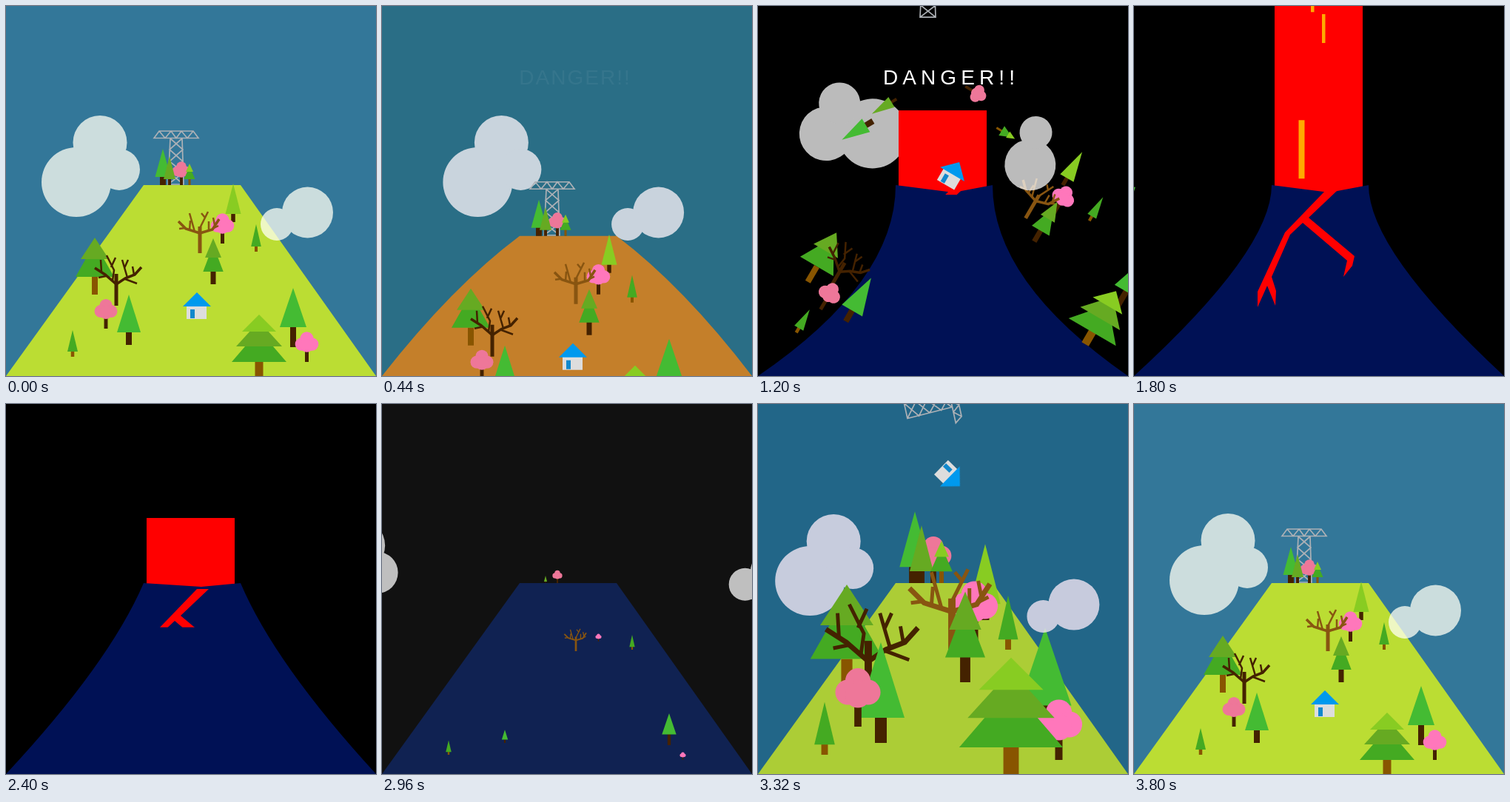
These frames come from a looping animation (500x500 px, 3840 ms). An HTML page:

```html
<!DOCTYPE html>
<html lang="en">
<head>
<meta charset="utf-8">
<title>Volcano</title>
<style>
html, body { margin: 0; width: 100%; height: 100%; overflow: hidden; background: #000; }
svg { display: block; width: 100vw; height: 100vh; }
.sky, .hill, .dip, .fly, .grow, .toss, .cloud, .lava, .bars, .crack, text {
  animation: 3840ms linear infinite;
}
.sky { animation-name: sky; }
.hill { animation-name: paint, bend; }
.dip { animation-name: dip; }
.fly { animation-name: fly; }
.grow { animation-name: grow; }
.toss { animation-name: toss; }
.cloud { animation-name: cloud, tint; opacity: .75; }
.lava { animation-name: lava; fill: #f00; }
.bars { animation-name: bars; fill: #fa0; }
.bars rect { animation: rise 480ms linear infinite; }
.crack { animation-name: crack; fill: #f00; }
text {
  font: 28px "Liberation Sans", Arial, sans-serif;
  fill: #fff; text-anchor: middle; animation-name: warn;
}

@keyframes sky {
  0% { fill: #379; } 20.83% { fill: #267; } 26.04% { fill: #156; }
  30.21%, 75.5% { fill: #000; } 77.08% { fill: #111; }
  86.46% { fill: #268; } 88.5%, to { fill: #379; }
}
@keyframes tint {
  0% { fill: #fffff4; } 20.83% { fill: #ffeefe; }
  30.21%, 77.08% { fill: #fafafa; }
  86.46% { fill: #ffeefa; } 88.5%, to { fill: #fffff4; }
}
@keyframes paint {
  0% { fill: #bd3; } 20.83% { fill: #c32; } 26.04% { fill: #d01020; }
  30.21%, 76.17% { fill: #015; } 87.37%, to { fill: #bd3; }
}
@keyframes bend {
  0% {
    d: path("M0 500Q93 371 186 242L264 242L317 242Q408.5 371 500 500Z");
    animation-timing-function: cubic-bezier(.37, 0, .63, 1);
  }
  23.44%, 26.04% { d: path("M0 500Q96 388 186 384L264 384L317 384Q407 388 500 500Z"); }
  29.17%, 31.25% { d: path("M0 500Q186 373 186 242L264 252L317 242Q317 373 500 500Z"); }
  40%, 57.3% { d: path("M0 500Q186 330 186 242L264 252L317 242Q317 330 500 500Z"); }
  67.7%, to { d: path("M0 500Q93 371 186 242L264 242L317 242Q408.5 371 500 500Z"); }
}
@keyframes dip {
  0% { translate: 0 0; animation-timing-function: cubic-bezier(.37, 0, .63, 1); }
  23.44%, 26.04% { translate: 0 142px; }
  29.17%, to { translate: 0 0; }
}
@keyframes fly {
  0%, 28.125% { translate: 0 0; rotate: 0deg; }
  51.56% { translate: var(--x) var(--y); rotate: var(--r); }
  51.57%, to { translate: 0 0; rotate: 0deg; }
}
@keyframes toss {
  0%, 28.125% { translate: 0 0; rotate: 0deg; }
  51.56% { translate: var(--x) var(--y); rotate: var(--r); }
  75.52% {
    translate: var(--fx) var(--fy); rotate: var(--fr);
    animation-timing-function: cubic-bezier(.333, .667, .667, 1);
  }
  97.4%, to { translate: 0 0; rotate: 0deg; }
}
@keyframes cloud {
  0% { translate: 0 0; rotate: 0deg; animation-timing-function: cubic-bezier(.37, 0, .63, 1); }
  23.44%, 28.125% { translate: var(--in) 0; rotate: 0deg; }
  46.87% { translate: var(--x) var(--y); rotate: var(--r); }
  46.88%, 72.92% {
    translate: var(--fx) var(--fy); rotate: 0deg;
    animation-timing-function: cubic-bezier(.333, 1, .667, 1);
  }
  97.4%, to { translate: 0 0; rotate: 0deg; }
}
@keyframes grow {
  0%, 47.91% { scale: 1; }
  47.92%, 75% { scale: 0; animation-timing-function: cubic-bezier(.3, .35, .6, 1); }
  85.42% { scale: 2; animation-timing-function: cubic-bezier(.45, 0, .55, 1); }
  94.8%, to { scale: 1; }
}
@keyframes lava {
  0%, 29.16% { translate: 0 500px; }
  29.17% { translate: 0 242px; }
  34.22%, 58.6% { translate: 0 0; }
  65.1% { translate: 0 255px; }
  65.11%, to { translate: 0 500px; }
}
@keyframes bars {
  0%, 34.3% { opacity: 0; }
  34.31%, 58.6% { opacity: 1; }
  58.61%, to { opacity: 0; }
}
@keyframes rise {
  from { translate: 0 260px; }
  to { translate: 0 -100px; }
}
@keyframes crack {
  0%, 29.17% { clip-path: inset(0 0 100% 0); }
  31.25% { clip-path: inset(0 0 97% 0); }
  44.3%, 57.3% { clip-path: inset(0); }
  65.1%, to { clip-path: inset(0 0 100% 0); }
}
@keyframes warn {
  0%, 10.42% { opacity: 0; letter-spacing: 1.8px; }
  31.25% { opacity: 1; letter-spacing: 6.1px; }
  35.2% { opacity: 1; letter-spacing: 7px; }
  43%, to { opacity: 0; letter-spacing: 9px; }
}
</style>
</head>
<body>
<svg viewBox="0 0 500 500">
  <rect class="sky" width="500" height="500"/>
  <g transform="translate(115 216)">
    <g class="cloud" style="--in:71px;--x:-289px;--y:-294px;--r:-720deg;--fx:-280px;--fy:12px">
      <circle cx="-20" cy="22" r="47"/><circle cx="12" cy="-31.500" r="36.500"/><circle cx="38" cy="5" r="28"/>
    </g>
  </g>
  <text x="261" y="106">DANGER!!</text>
  <g class="lava">
    <rect x="190" width="119" height="260"/>
    <g class="bars">
      <rect x="239" width="4.500" height="40" style="animation-delay:-28ms"/>
      <rect x="254" width="4.500" height="39" style="animation-delay:-451ms"/>
      <rect x="222.500" width="8" height="79" style="animation-delay:-260ms"/>
    </g>
  </g>
  <path class="hill"/>
  <path class="crack" d="M258 250L274 250L236 286L298 338L295 351L283 366L288 344L228 293L211 309L186 366L192 385L191 405L180 378L167 407L167 386L204 306Z"/>
  <g class="dip" id="land"></g>
  <g transform="translate(393 281)">
    <g class="cloud" style="--in:-70px;--x:231px;--y:-474px;--r:720deg;--fx:219px;--fy:-90px">
      <circle cx="14.500" cy="-2" r="34.500"/><circle cx="-27" cy="14" r="22"/>
    </g>
  </g>
</svg>
<script>
const DARK = '#420', BROWN = '#850';
const GREEN = '#4b3', MOSS = '#4a2', OLIVE = '#6a2', LIME = '#8c2';
const ROSE = '#e79', PINK = '#f7b';

// Every shape stands on its own origin, growing upwards.
const trunk = (w, h, fill) => `<rect x="${-w / 2}" y="${-h}" width="${w}" height="${h}" fill="${fill}"/>`;
const tier = (w, top, bottom, fill) => `<path fill="${fill}" d="M0 ${-top}L${w} ${-bottom}H${-w}Z"/>`;
const pine = (h, foot, w, fill, tw, bark) => trunk(tw, foot + 1, bark) + tier(w, h, foot, fill);

const blossom = (s, fill) => `<g transform="scale(${s})">${trunk(5, 20, DARK)}<g fill="${fill}">` +
  [[0, -32], [-7, -24], [7, -24], [0, -22]].map(([x, y]) => `<circle cx="${x}" cy="${y}" r="8.800"/>`).join('') +
  '</g></g>';

const bare = (stroke, limbs, twigs, h) => trunk(5, h, stroke) +
  `<g fill="none" stroke="${stroke}"><path stroke-width="3.500" d="${limbs}"/><path stroke-width="2.500" d="${twigs}"/></g>`;

const bareLeft = bare(DARK,
  'M0-29L-15-42L-29-51M0-29L12-37L25-42L34-52',
  'M-14-40L-24-38M-20-45L-21-62M-5-34L-3-48L-13-68M-7-52L-1-65M15-38L8-62M11-51L16-62M12-36L28-30M24-42L22-53', 43);
const bareRight = bare('#851',
  'M0-27L-19-33L-29-43M0-27L17-32L26-46',
  'M-14-31L-13-44M-20-34L-28-33M-7-29L-14-54M0-34L11-56M7-48L2-54M12-31L12-43M17-33L25-37M20-38L18-48', 36);

const house = '<path fill="#ddd" d="M-14-18H13V0H-14Z"/><path fill="#09e" d="M-19-17L0-36L19-17Z"/><path fill="#18c" d="M-9-13H-3V-1H-9Z"/>';
const tower = '<path fill="none" stroke="#adb1b6" stroke-width="1.700" d="M-30-62.500L-23-72H23L30-62.500Z' +
  'M-23-72L-15-62.500L-7-72L0-62.500L7-72L15-62.500L23-72' +
  'M-8-62L-11 0H10L8-62M-8-62L9-47L-9-31L10-16L-11 0M8-62L-9-47L9-31L-10-16L10 0"/>';

const place = (x, y, h, cls, vars, body) =>
  `<g transform="translate(${x} ${y})"><g class="${cls}" style="transform-origin:0 ${-h / 2}px;${vars}">${body}</g></g>`;

// Drift is the offset reached 120 ms after the blast; the flight lasts 900 ms.
const drift = (x, y, r) => `--x:${x * 7.5}px;--y:${y * 7.5}px;--r:${r * 7.5}deg;`;
const plant = (x, y, h, late, dx, dy, r, body) =>
  place(x, y, h, 'fly', drift(dx, dy, r), `<g class="grow" style="animation-delay:${late * 40}ms">${body}</g>`);

document.getElementById('land').innerHTML = [
  place(230, 241, 72, 'toss', drift(0, -224, 0) + '--fx:20px;--fy:-816px;--fr:312deg', tower),
  plant(212, 242, 49, 2, -77, -49, -120, pine(49, 11, 10.5, GREEN, 8, DARK)),
  plant(237, 242, 31, 0, 56, -109, 120, blossom(.78, ROSE)),
  plant(221, 242, 39, 1, -50, -86, -120, pine(39, 8, 8, OLIVE, 4, DARK)),
  plant(248, 242, 29, 2, 86, -55, 120,
    trunk(3, 9, BROWN) + tier(7.5, 25, 8, MOSS) + tier(5, 29, 18, LIME)),
  plant(307, 292, 52, 2, 117, -46, 30, pine(52, 11, 10.5, LIME, 5.5, DARK)),
  plant(292.5, 321, 41, 1, 117, -38, 30, blossom(1, PINK)),
  plant(338, 332, 37, 0, 118, -39, 30, pine(37, 7, 6.8, MOSS, 4, BROWN)),
  plant(262, 334, 57, 0, 113, -43, 30, bareRight),
  plant(280, 376, 62, 2, 108, -53, 30,
    trunk(7, 18, DARK) + tier(13.7, 53, 17, MOSS) + tier(11, 62, 36, OLIVE)),
  plant(120, 390, 77, 3, -33, -12, 30,
    trunk(8, 24, BROWN) + tier(26, 70, 24, MOSS) + tier(19, 77, 48, OLIVE)),
  plant(149, 405, 68, 2, -36, -16, 30, bareLeft),
  plant(166, 458, 68, 1, -30, -27, 30, pine(68, 17, 16, GREEN, 8, DARK)),
  plant(135, 436, 40, 2, -40, -23, 30, blossom(.98, ROSE)),
  plant(90, 474, 36, 0, -29, -30, 30, pine(36, 7, 7, MOSS, 4.5, BROWN)),
  place(258, 423, 36, 'toss', drift(5, -177, 30) + '--fx:8px;--fy:-1232px;--fr:540deg', house),
  plant(388, 461, 80, 0, 115, -46, 30, pine(80, 27, 18, GREEN, 8, DARK)),
  plant(406.5, 481, 41, 1, 115, -45, 30, blossom(1, PINK)),
  plant(342, 500, 83, 3, 120, -37, 30,
    trunk(11, 20, BROWN) + tier(37, 62, 19, MOSS) + tier(31, 74, 40, OLIVE) + tier(23, 83, 60, LIME)),
].join('');
</script>
</body>
</html>
```
